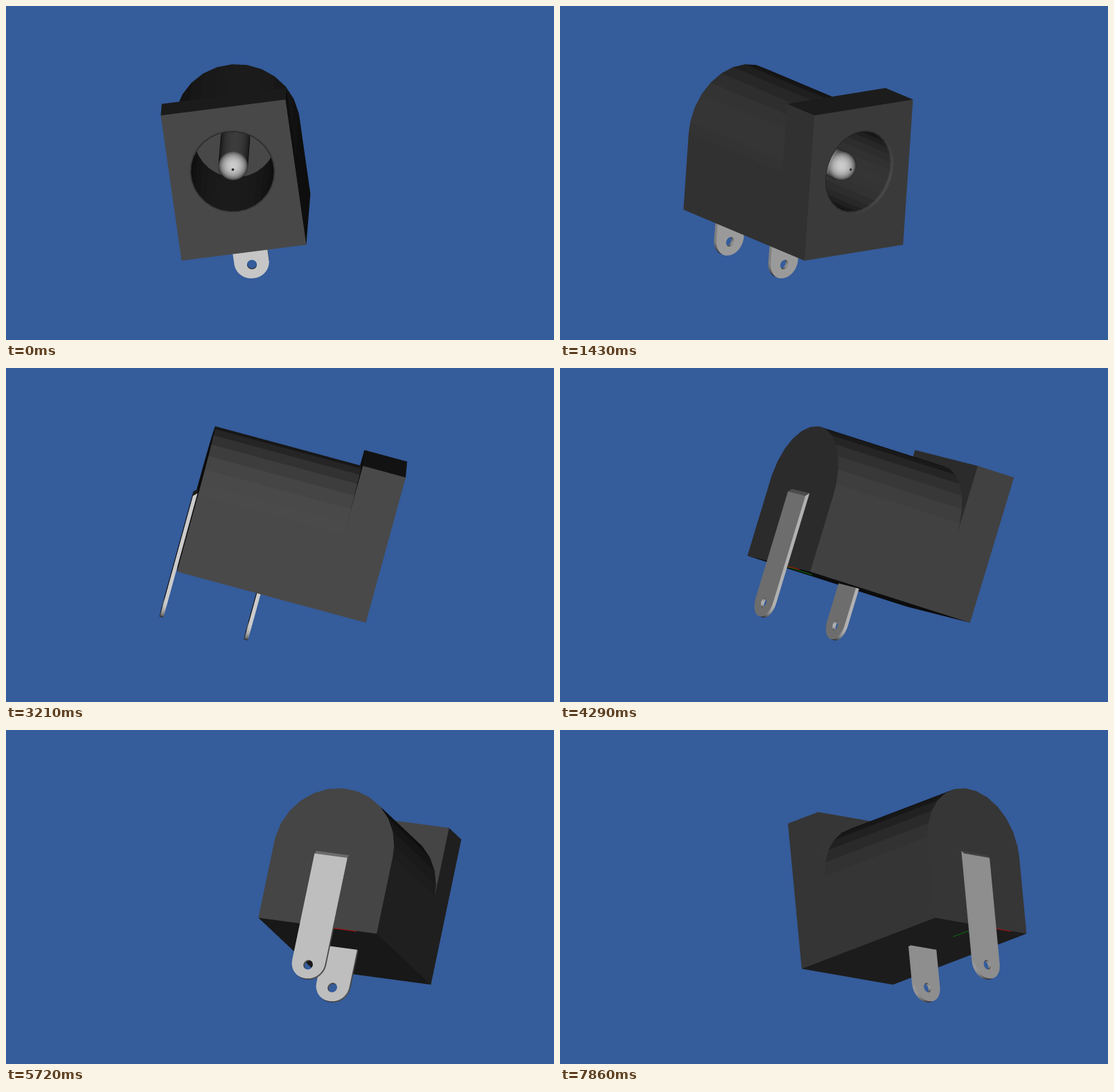
Write an HTML page with a canvas that moves like this. It is 791 by 483 pixels and loops after 8 s.

```html
<!DOCTYPE html>
<html lang="en">
<head>
<meta charset="utf-8">
<title>Barrel jack turntable</title>
<style>
html, body { margin: 0; width: 100%; height: 100%; overflow: hidden; background: #355c9b; }
canvas { display: block; }
</style>
</head>
<body>
<canvas id="stage" width="791" height="483"></canvas>
<script>
const ctx = document.getElementById('stage').getContext('2d');
const BG = 0x355c9b;

// Timing: 10.29 degrees per step, 35 steps per full turn
const LOOP = 8000, STEP = Math.PI * 2 / 35;
const TIMES = [360, 710, 1070, 1430, 1780, 2140, 2490, 2850, 3210, 3570, 3930,
  4290, 4640, 5000, 5360, 5720, 6080, 6430, 6790, 7140, 7500, 7860];

// Supersampled view window that encloses the part
const S = 3, VX = 168, VY = 76, VW = 516, VH = 326;
const BW = VW * S, BH = VH * S;
const depth = new Float32Array(BW * BH);
const color = new Uint32Array(BW * BH);

// Part axes (a, b: horizontal plane, y: screen down)
const U = { a: .990, b: .0560, y: -.1265 };
const V = { a: .1367, b: -.2560, y: .9567 };
const D = { a: .0212, b: -.965, y: -.2612 };
const ORIGIN = { a: -111.5, b: 148.2, y: 146.8 }, CX = 424.9;

// Dimensions
const HALF = 90.9, H = 219.5, LEN = 282.4, FLANGE = 64;
const ARCH_V = 103.2, BORE_V = 97.7, BORE_R = 59.5, BORE_D = 191, FILLET = 4;
const PIN_V = 99.3, PIN_R = 21.4, PIN_D = 41.6;

const PLASTIC = n => gray(10.5 + 63.5 * n);
const METAL = n => gray(8.5 + 196 * n);
const flat = c => () => c;
const gray = v => Math.round(v) * 0x10101;

const faces = [];
const add = (paint, ...rings) => faces.push({ paint, rings });

function circle(r, v, d, n = 30) {
  return Array.from({ length: n }, (_, i) => {
    const t = (i + .5) / n * Math.PI * 2;
    return [r * Math.cos(t), v + r * Math.sin(t), d];
  });
}

// Quads between two matching closed outlines
function skin(paint, p, q) {
  p.forEach((_, i) => {
    const j = (i + 1) % p.length;
    add(paint, [p[i], p[j], q[j], q[i]]);
  });
}

const rect = (u, v0, v1, d) => [[-u, v0, d], [u, v0, d], [u, v1, d], [-u, v1, d]];

function buildFlange() {
  const front = rect(HALF, 0, H, 0), back = rect(HALF, 0, H, FLANGE);
  add(PLASTIC, front, circle(BORE_R + FILLET, BORE_V, 0));
  add(PLASTIC, back, circle(BORE_R, BORE_V, FLANGE));
  skin(PLASTIC, front, back);
}

function buildBore() {
  const steps = 6;
  let prev = circle(BORE_R + FILLET, BORE_V, 0);
  for (let i = 1; i <= steps; i++) {
    const t = i / steps * Math.PI / 2;
    const next = circle(BORE_R + FILLET * (1 - Math.sin(t)), BORE_V, FILLET * (1 - Math.cos(t)));
    skin(PLASTIC, prev, next);
    prev = next;
  }
  const end = circle(BORE_R, BORE_V, BORE_D);
  skin(PLASTIC, prev, end);
  add(PLASTIC, end);
}

function buildBody() {
  const outline = d => {
    const pts = [[-HALF, H, d]];
    for (let i = 0; i <= 14; i++) {
      const deg = Math.min(180, Math.max(0, -3.75 + 13.85 * i));
      const t = deg * Math.PI / 180;
      pts.push([-HALF * Math.cos(t), ARCH_V - HALF * Math.sin(t), d]);
    }
    pts.push([HALF, H, d]);
    return pts;
  };
  const back = outline(LEN);
  skin(PLASTIC, outline(FLANGE), back);
  add(PLASTIC, back);
}

function buildPin() {
  const n = 40, rows = 14;
  let prev = circle(PIN_R, PIN_V, BORE_D, n);
  for (let i = 0; i < rows; i++) {
    const t = i / rows * Math.PI / 2;
    const next = circle(PIN_R * Math.cos(t), PIN_V, PIN_D - PIN_R * Math.sin(t), n);
    skin(METAL, prev, next);
    prev = next;
  }
  add(METAL, prev);
  add(flat(0x2a2a2a), circle(1.9, PIN_V, PIN_D - PIN_R - .2, 12));
}

function buildTab(d0, d1, top0, top1) {
  const half = 25.25, r = 24.5, end = H + 81.1;
  const outline = (top, d) => {
    const pts = [[-half, top, d], [half, top, d]];
    for (let i = 0; i <= 20; i++) {
      const t = i / 20 * Math.PI;
      const shift = i < 10 ? half - r : i > 10 ? r - half : 0;
      pts.push([shift + r * Math.cos(t), end - r + r * Math.sin(t), d]);
    }
    return pts;
  };
  const hole = d => circle(7.1, H + 60.5, d, 24);
  const front = outline(top0, d0), back = outline(top1, d1);
  add(METAL, front, hole(d0));
  add(METAL, back, hole(d1));
  skin(METAL, front, back);
  skin(METAL, hole(d0), hole(d1));
}

buildFlange();
buildBore();
buildBody();
buildPin();
buildTab(156, 161.5, H, H);
buildTab(LEN, LEN + 5.4, 109.7, 115.1);

// Small axis marks at the rear bottom edge
const MARK_V = H + .6;
const AXES = [
  { from: [0, MARK_V, LEN], to: [-60, MARK_V, LEN], c: 0xb01010 },
  { from: [0, MARK_V, LEN], to: [0, MARK_V, LEN - 59], c: 0x0c700c }
];

function projector(angle) {
  const c = Math.cos(angle), s = Math.sin(angle);
  return ([u, v, d]) => {
    const mix = k => ORIGIN[k] + u * U[k] + v * V[k] + d * D[k];
    const a = mix('a'), b = mix('b');
    return [(CX + a * c + b * s - VX) * S, (mix('y') - VY) * S, (b * c - a * s) * S];
  };
}

// Even-odd scanline fill of a planar face into the depth buffer
function fill(rings, paint) {
  let nx = 0, ny = 0, nz = 0;
  const ring = rings[0];
  ring.forEach((p, i) => {
    const q = ring[(i + 1) % ring.length];
    nx += (p[1] - q[1]) * (p[2] + q[2]);
    ny += (p[2] - q[2]) * (p[0] + q[0]);
    nz += (p[0] - q[0]) * (p[1] + q[1]);
  });
  const facing = Math.abs(nz) / Math.hypot(nx, ny, nz);
  if (!(facing > .003)) return;
  const c = paint(Math.min(1, facing));
  const [x0, y0, z0] = ring[0], gx = -nx / nz, gy = -ny / nz;
  const ys = ring.map(p => p[1]);
  const top = Math.max(0, Math.ceil(Math.min(...ys) - .5));
  const bottom = Math.min(BH, Math.ceil(Math.max(...ys) - .5));
  for (let row = top; row < bottom; row++) {
    const y = row + .5, xs = [];
    for (const pts of rings) {
      for (let i = 0, j = pts.length - 1; i < pts.length; j = i++) {
        const p = pts[i], q = pts[j];
        if ((p[1] <= y) !== (q[1] <= y)) {
          xs.push(p[0] + (y - p[1]) / (q[1] - p[1]) * (q[0] - p[0]));
        }
      }
    }
    xs.sort((a, b) => a - b);
    for (let k = 0; k + 1 < xs.length; k += 2) {
      const from = Math.max(0, Math.ceil(xs[k] - .5));
      const to = Math.min(BW, Math.ceil(xs[k + 1] - .5));
      let z = z0 + gx * (from + .5 - x0) + gy * (y - y0);
      for (let x = from, i = row * BW + from; x < to; x++, i++, z += gx) {
        if (z > depth[i]) {
          depth[i] = z;
          color[i] = c;
        }
      }
    }
  }
}

function drawAxis(axis, project) {
  const p = project(axis.from), q = project(axis.to);
  const w = S * .5, lift = S * .6;
  const at = (pt, dy) => [pt[0], pt[1] + dy, pt[2] + lift];
  // Painted at full colour whatever the slope of the thin quad
  fill([[at(p, -w), at(q, -w), at(q, w), at(p, w)]], flat(axis.c));
}

function resolve() {
  const img = ctx.createImageData(VW, VH), out = img.data, area = S * S;
  for (let y = 0, o = 0; y < VH; y++) {
    for (let x = 0; x < VW; x++, o += 4) {
      let r = 0, g = 0, b = 0;
      for (let j = 0; j < S; j++) {
        const i = (y * S + j) * BW + x * S;
        for (let k = 0; k < S; k++) {
          const c = color[i + k];
          r += c >> 16;
          g += c >> 8 & 255;
          b += c & 255;
        }
      }
      out[o] = r / area;
      out[o + 1] = g / area;
      out[o + 2] = b / area;
      out[o + 3] = 255;
    }
  }
  return img;
}

function render(step) {
  depth.fill(-1e9);
  color.fill(BG);
  const project = projector(step * STEP);
  for (const f of faces) fill(f.rings.map(r => r.map(project)), f.paint);
  for (const axis of AXES) drawAxis(axis, project);
  return resolve();
}

const cache = [];
let shown = -1;

function tick() {
  const t = performance.now() % LOOP;
  const step = TIMES.filter(x => x <= t).length;
  if (step !== shown) {
    cache[step] = cache[step] || render(step);
    ctx.putImageData(cache[step], VX, VY);
    shown = step;
  }
  requestAnimationFrame(tick);
}

ctx.fillStyle = '#355c9b';
ctx.fillRect(0, 0, 791, 483);
tick();
</script>
</body>
</html>
```
